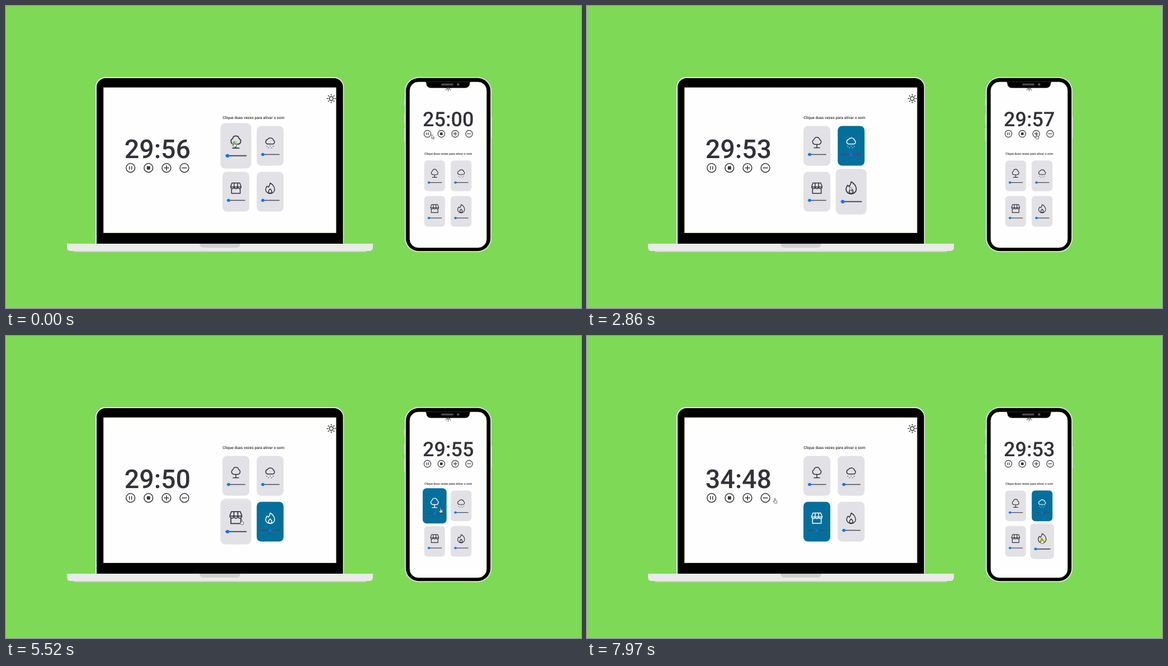
Write an HTML page that moves like this. It is 1028x540 px and loops after 8000 ms.

```html
<!DOCTYPE html>
<html lang="pt-BR">
<head>
<meta charset="utf-8">
<title>Focus timer</title>
<style>
  html, body { margin: 0; width: 100%; height: 100%; overflow: hidden; background: #7ed957; }
  svg { display: block; width: 100%; height: 100%; }
  text { font-family: Roboto, sans-serif; font-weight: 500; fill: #323238; text-anchor: middle; text-rendering: geometricPrecision; }
  .line { fill: none; stroke: #323238; stroke-width: 1.5; stroke-linecap: round; stroke-linejoin: round; }
</style>
</head>
<body>
<svg viewBox="0 0 1028 540">
  <defs>
    <clipPath id="laptopClip"><rect x="174.5" y="146" width="415.5" height="259.5"/></clipPath>
    <g id="sun" class="line"><circle r="3.4"/></g>
    <g id="arrow"><path d="M0 0V7.2L1.7 5.7L2.9 8.3L4 7.8L2.9 5.3H5Z" fill="#fff" stroke="#333" stroke-width=".7"/></g>
    <g id="hand"><path d="M-.8 .8a.8 .8 0 0 1 1.6 0V4L3.3 4.6Q4 4.8 3.9 5.8L3.2 9H-.9L-3 6.2Q-3 5.2-2 5.4L-.8 6.3Z" fill="#fff" stroke="#333" stroke-width=".7"/></g>
  </defs>

  <!-- laptop -->
  <path d="M160 426V145a18 18 0 0 1 18-18H586a18 18 0 0 1 18 18V426Z" fill="#e9eee5"/>
  <path d="M162 426V145a16 16 0 0 1 16-16H586.5a16 16 0 0 1 16 16V426Z"/>
  <rect x="174.5" y="146" width="415.5" height="259.5" fill="#fefefe" stroke="#dce8c4" stroke-width=".8"/>
  <path d="M120 437H645L643 440H122Z" fill="#c9d5c2"/>
  <path d="M109 425H656V432a6 6 0 0 1-6 6H115a6 6 0 0 1-6-6Z" fill="#ebe9ea"/>
  <path d="M346 425H419a7 7 0 0 1-7 7H353a7 7 0 0 1-7-7Z" fill="#d1cfd0"/>

  <!-- phone -->
  <path d="M712.7 167v11M712.7 193v19M712.7 219v23M868.2 198v38" stroke="#c5d5bd" stroke-width="1.8"/>
  <rect x="713" y="127" width="155" height="313" rx="25" fill="#e4ebdf"/>
  <rect x="714.8" y="128.8" width="151.4" height="309.4" rx="23"/>
  <rect x="722" y="136" width="137" height="296" rx="15" fill="#fefefe" stroke="#dce8c4" stroke-width=".8"/>

  <g clip-path="url(#laptopClip)"><use href="#sun" x="581.5" y="165.5"/></g>
  <use href="#sun" transform="translate(790.5 146) scale(.773)"/>
  <path d="M749 135.5H831Q829 136 829 138.5a8 8 0 0 1-8 8H759.5a8 8 0 0 1-8-8Q751.500 136 749 135.5Z"/>
  <rect x="778" y="138.6" width="22" height="3.4" rx="1.7" fill="#4b4b4b"/>
  <circle cx="808.3" cy="140.2" r="2.2" fill="#555"/>
  <g id="apps"></g>
</svg>
<script>
const LOOP = 8000, FADE = 300, HOVER_SCALE = 1.15;
const IDLE = [225, 225, 230], ACTIVE = [2, 111, 156];
const ICONS = {
  tree: 'M-3.5-2.500A4.6 4.6 0 0 1-5-11.2A5.1 5.1 0 0 1 5-11.2A4.6 4.6 0 0 1 3.5-2.5ZM0-2.5V3.5M-5 3.5H5',
  rain: 'M-5-3.2A4.2 4.2 0 0 1-4.7-11.3A6 6 0 0 1 6-10A3.8 3.8 0 0 1 5.5-3.2ZM-6 .8h.1M0 .2h.1M5.500 .8h.1M-3 3.6h.1M2.600 3.6h.1',
  store: 'M-9.2-8.5V-9.5L-7-15.5H7L9.2-9.500V-8.5ZM-3-15.5L-3.1-8.5M3-15.5L3.1-8.5M-9.2-8.5a3 3 0 0 0 6.1 0a3 3 0 0 0 6.2 0a3 3 0 0 0 6.1 0M-7.7-5V3H7.7V-5',
  fire: 'M0-15.5C-.2-12-1.800-10-3-8L-5.5-10C-7.300-7.500-8-5.500-8-4A8 7.5 0 0 0 8-4C8-9 4-13.500 0-15.5ZM0-5C-2-3-3-2-3-.3A3 3 0 0 0 3-.3C3-2 2-3 0-5Z'
};
const NAMES = Object.keys(ICONS);

// hover: [enter, leave]; on: [select, deselect]; path: [time, x, y, cursor]
const DEVICES = [
  {
    scale: 1, controls: [270.8, 289.5], cards: [441.6, 291],
    start: 29 * 60 + 56, ticks: [400, 1410, 2420, 3430, 4440, 5450, 6460, 7470], plus: 7250,
    hover: { tree: [-1000, 880], rain: [970, 2150], fire: [2250, 4800], store: [4930, 6150] },
    on: { tree: [200, 1450], rain: [1450, 3650], fire: [3650, 5650], store: [5650, 9999] },
    glow: '#7fe35f', clicks: [200],
    path: [[0, 408, 243, 'hand'], [600, 408, 244, 'hand'], [850, 430, 246, 'hand'], [1040, 462, 246, 'hand'],
      [1300, 469, 246, 'hand'], [1750, 470, 248, 'hand'], [2250, 472, 292, 'arrow'], [2600, 471, 322, 'arrow'],
      [3400, 466, 326, 'hand'], [4500, 463, 326, 'hand'], [4930, 436, 328, 'hand'], [5150, 421, 328, 'hand'],
      [5900, 421, 328, 'hand'], [6150, 384, 316, 'arrow'], [6500, 340, 295, 'arrow'], [6750, 340, 295, 'arrow'],
      [7100, 288, 289, 'hand'], [7500, 288, 289, 'hand'], [7900, 336, 290, 'hand']]
  },
  {
    scale: .773, controls: [790.7, 228.5], cards: [790, 335.4],
    start: 25 * 60, ticks: [790, 1805, 2790, 3835, 4850, 5840, 6880], plus: 2300,
    hover: { tree: [4180, 5700], rain: [5800, 6970], fire: [7120, 9999] },
    on: { tree: [4900, 6645], rain: [6640, 9999] },
    glow: '#ece04a', clicks: [8100],
    path: [[0, 761, 230, 'arrow'], [200, 761, 230, 'arrow'], [950, 793, 233, 'arrow'], [1150, 794, 233, 'arrow'],
      [1500, 804, 229, 'hand'], [3400, 804, 229, 'arrow'], [4120, 776, 279, 'arrow'], [4200, 777, 284, 'hand'],
      [4600, 777, 307, 'hand'], [5600, 777, 307, 'hand'], [5900, 811, 306, 'hand'], [6800, 811, 306, 'hand'],
      [7250, 813, 362, 'hand']]
  }
];

function add(parent, tag, attrs = {}, text) {
  const el = document.createElementNS('http://www.w3.org/2000/svg', tag);
  set(el, attrs);
  if (text) el.textContent = text;
  parent.append(el);
  return el;
}
function set(el, attrs) {
  for (const key in attrs) el.setAttribute(key, attrs[key]);
}
const clamp = v => Math.max(0, Math.min(1, v));
const mix = (a, b, p) => a + (b - a) * p;

// CSS "ease": cubic-bezier(.25, .1, .25, 1)
function ease(x) {
  if (x <= 0 || x >= 1) return clamp(x);
  const bezier = (s, a, b) => 3 * a * s * (1 - s) ** 2 + 3 * b * s * s * (1 - s) + s ** 3;
  let low = 0, high = 1;
  for (let i = 0; i < 18; i++) {
    const mid = (low + high) / 2;
    if (bezier(mid, .25, .25) < x) low = mid; else high = mid;
  }
  return bezier(low, .1, 1);
}
const level = (t, [from, to] = [9999, 9999]) => ease((t - from) / FADE) - ease((t - to) / FADE);
const isOn = (t, [from, to] = [9999, 9999]) => t >= from && t < to;

function buildControls(parent) {
  const marks = ['M-2-2.600V2.6M2-2.6V2.6', 'M-2.2-2.2H2.2V2.2H-2.2Z', 'M-4 0H4M0-4V4', 'M-4 0H4'];
  marks.forEach((d, i) => {
    const button = add(parent, 'g', { class: 'line', transform: `translate(${(i - 1.5) * 32.1} 0)` });
    add(button, 'circle', { r: 7.9 });
    add(button, 'path', { d, fill: i === 1 ? '#323238' : 'none' });
  });
}

function buildCard(parent, name, i) {
  const x = (i % 2 - .5) * 61.3, y = (i < 2 ? -.5 : .5) * 82;
  const group = add(parent, 'g');
  const back = add(group, 'rect', { x: -24, y: -35.5, width: 48, height: 71, rx: 8 });
  const icon = add(group, 'path', { class: 'line', d: ICONS[name] });
  add(group, 'path', { d: 'M-15.5 15.500H16', stroke: '#4b4b52', 'stroke-width': 1.7, 'stroke-linecap': 'round' });
  const thumb = add(group, 'circle', { cy: 15.5, r: 2.7, fill: '#0075ff' });
  return { name, x, y, group, back, icon, thumb };
}

function buildDevice(device) {
  const root = document.getElementById('apps');
  const block = ([x, y]) => add(root, 'g', { transform: `translate(${x} ${y}) scale(${device.scale})` });
  const controls = block(device.controls), cards = block(device.cards);
  device.timer = add(controls, 'text', { y: -18, 'font-size': 46.5 });
  buildControls(controls);
  add(cards, 'text', { x: .9, y: -89.3, 'font-size': 6.87 }, 'Clique duas vezes para ativar o som');
  device.cardViews = NAMES.map((name, i) => buildCard(cards, name, i));
  device.halo = add(root, 'circle', { r: 5, fill: device.glow, opacity: .75 });
  device.cursor = add(root, 'use');
}

function clock(device, t) {
  const left = device.start - device.ticks.filter(at => t >= at).length + (t >= device.plus ? 300 : 0);
  return [Math.floor(left / 60), left % 60].map(n => String(n).padStart(2, '0')).join(':');
}

function pointer(path, t) {
  const next = path.findIndex(stop => stop[0] > t);
  if (next < 0) return path[path.length - 1].slice(1);
  const a = path[next - 1], b = path[next];
  const p = (t - a[0]) / (b[0] - a[0]), smooth = p * p * (3 - 2 * p);
  return [mix(a[1], b[1], smooth), mix(a[2], b[2], smooth), a[3]];
}

function draw(device, t) {
  device.timer.textContent = clock(device, t);
  for (const card of device.cardViews) {
    const span = device.on[card.name], on = isOn(t, span), tint = level(t, span);
    const size = mix(1, HOVER_SCALE, level(t, device.hover[card.name]));
    set(card.group, { transform: `translate(${card.x} ${card.y}) scale(${size})` });
    set(card.back, { fill: `rgb(${IDLE.map((c, i) => Math.round(mix(c, ACTIVE[i], tint)))})` });
    card.icon.style.stroke = on ? '#fff' : '#323238';
    set(card.thumb, { cx: on ? 0 : -13 });
  }
  const [x, y, kind] = pointer(device.path, t);
  const pressed = device.clicks.some(at => t > at - 250 && t < at - 50);
  set(device.halo, { cx: x + 1, cy: y + 3, visibility: pressed ? 'visible' : 'hidden' });
  set(device.cursor, { href: '#' + kind, transform: `translate(${x} ${y})` });
}

for (let i = 0; i < 8; i++) {
  add(document.getElementById('sun'), 'path', { d: 'M0-6V-7.5', transform: `rotate(${i * 45})` });
}
DEVICES.forEach(buildDevice);

const began = performance.now();
function frame() {
  const t = (performance.now() - began) % LOOP;
  DEVICES.forEach(device => draw(device, t));
  requestAnimationFrame(frame);
}
frame();
</script>
</body>
</html>
```
